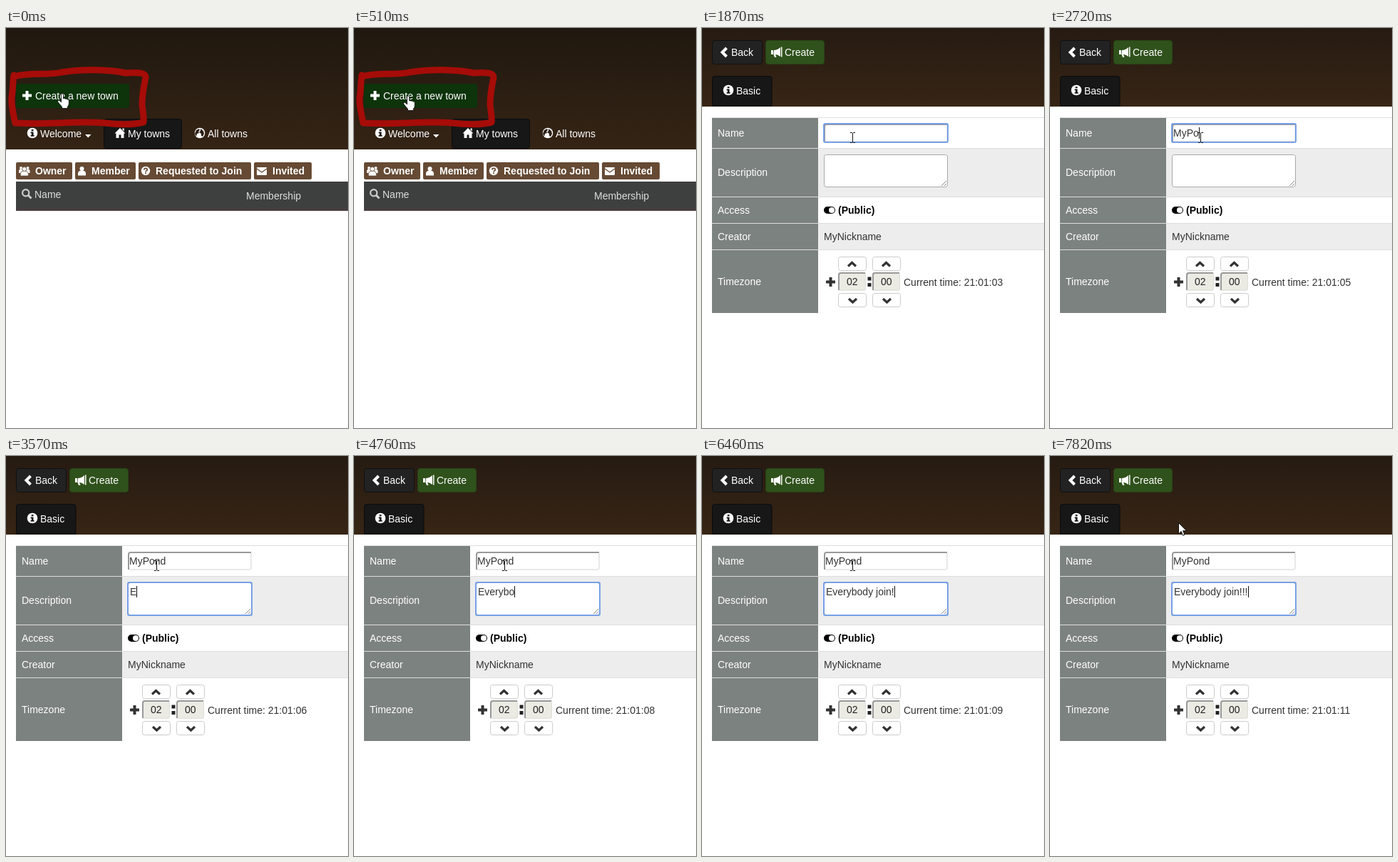
An HTML page for the animation above (7990 ms loop, 480 by 560 pixels).

```html
<!DOCTYPE html>
<html lang="en">
<head>
<meta charset="utf-8">
<title>Create a town</title>
<style>
html, body { margin: 0; width: 100%; height: 100%; overflow: hidden; background: #fff; }
.view, svg { position: absolute; left: 0; top: 0; width: 480px; height: 560px; }
.view { overflow: hidden; background: #fff; font: 14px/20px "Liberation Sans", Arial, sans-serif; color: #333; }
.view[hidden] { display: none; }
p { position: absolute; margin: 0; white-space: pre; left: var(--x); top: var(--y); }
.w { color: #fff; }
.b { font-weight: bold; }
.dim { color: #ddd; }
.caret { position: absolute; width: 1px; height: 16px; margin-top: 2px; background: #111; }
</style>
</head>
<body>
<div class="view" id="list">
  <svg viewBox="0 0 480 560">
    <defs>
      <linearGradient id="head" x2="0" y2="1"><stop stop-color="#20180f"/><stop offset="1" stop-color="#352415"/></linearGradient>
      <g id="info">
        <circle r="7.3" fill="#fff"/>
        <path d="M-1.3-5h2.8v2.3h-2.8zM-2.4-1.4h3.9v4.5h1.1v1.6h-5v-1.6h1.2v-2.9h-1.2z" fill="#17130f"/>
      </g>
      <path id="plus" d="M-2-6.5h4v4.5h4.5v4h-4.5v4.5h-4v-4.5h-4.5v-4h4.5z"/>
      <g id="person"><circle cy="-3.5" r="3"/><path d="M-5.5 6v-2.5q0-3.7 3.5-4.2h4q3.500 .5 3.500 4.200v2.500z"/></g>
    </defs>
    <path d="M0 0h480v170H0z" fill="url(#head)"/>
    <rect x="14" y="78" width="159" height="34" rx="4" fill="#0d340a"/>
    <use href="#plus" x="29.500" y="94.500" fill="#fff"/>
    <rect x="137.500" y="127.500" width="109" height="41" rx="3" fill="#171717" stroke="#0b0b0b"/>
    <use href="#info" x="37" y="147"/>
    <g fill="#fff">
      <path d="M111 149h8.500l-4.250 4.500z"/>
      <path d="M160 140l7.500 7.500h-2v6.500h-4v-4.500h-3v4.500h-4v-6.500h-2zM163.500 140.500h2.200v4l-2.200-2z"/>
      <circle cx="272" cy="147" r="7.300"/>
    </g>
    <path d="M267 143l4-2 1 2-2 2 1 2-3 1-1 4-2-4zM273 141l4 3 1 4-2 4-2-1v-3l-3-2 2-2z" fill="#2d2014"/>
    <g fill="#664a34">
      <rect x="14" y="188" width="79" height="24" rx="2"/>
      <rect x="97" y="188" width="85" height="24" rx="2"/>
      <rect x="186" y="188" width="158" height="24" rx="2"/>
      <rect x="348" y="188" width="81" height="24" rx="2"/>
    </g>
    <g fill="#fff">
      <circle cx="21" cy="196" r="2"/><circle cx="30.500" cy="196" r="2"/>
      <path d="M18 203v-3q0-2 2-2h3v5zM33.500 203v-3q0-2-2-2h-3v5z"/>
      <use href="#person" x="25.800" y="201" stroke="#664a34" stroke-width=".7"/>
      <use href="#person" x="106.500" y="200.500"/>
      <circle cx="196" cy="200" r="6.200"/>
      <rect x="352" y="195" width="14" height="11" rx="1"/>
    </g>
    <path d="M193.800 198.600q0-2.200 2.200-2.200t2.200 2q0 1.100-1.200 1.600-1 .5-1 1.500M196 202.300v1.700" fill="none" stroke="#664a34" stroke-width="1.700"/>
    <path d="M352 197l7 5 7-5" fill="none" stroke="#664a34" stroke-width="1.300"/>
    <path d="M14 215h466v41H14z" fill="#3e403f"/>
    <path d="M14 252h466v4H14z" fill="#463f40"/>
    <g fill="none" stroke="#ccc"><circle cx="27.700" cy="230.700" r="4.600" stroke-width="2.200"/><path d="M31 234l4.500 4.500" stroke-width="2.800"/></g>
    <path d="M11 68C35 61 58 67 78 62 108 57 145 58 168 63 183 62 196 62 196 69 193 83 191 96 191 107 192 118 194 125 193 132 176 136 155 135 138 133 115 131 95 132 72 133 50 134 32 134 13 133 10 120 7 108 8 97 10 87 9 78 11 66"
      fill="none" stroke="#a60c08" stroke-width="9" stroke-linecap="round" stroke-linejoin="round"/>
  </svg>
  <p class="w" style="--x:41px;--y:85px">Create a new town</p>
  <p class="w" style="--x:48px;--y:138px">Welcome</p>
  <p class="w" style="--x:171px;--y:138px">My towns</p>
  <p class="w" style="--x:283px;--y:138px">All towns</p>
  <p class="w b" style="--x:41px;--y:190px">Owner</p>
  <p class="w b" style="--x:120px;--y:190px">Member</p>
  <p class="w b" style="--x:210px;--y:190px">Requested to Join</p>
  <p class="w b" style="--x:374px;--y:190px">Invited</p>
  <p class="dim" style="--x:40px;--y:223px">Name</p>
  <p class="dim" style="--x:337px;--y:225px">Membership</p>
</div>

<div class="view" id="form" hidden>
  <svg viewBox="0 0 480 560">
    <defs>
      <linearGradient id="head2" x2="0" y2="1"><stop stop-color="#261b12"/><stop offset="1" stop-color="#372515"/></linearGradient>
      <g id="info2">
        <circle r="7.300" fill="#fff"/>
        <path d="M-1.300-5h2.800v2.300h-2.800zM-2.400-1.400h3.900v4.500h1.100v1.600h-5v-1.600h1.200v-2.900h-1.200z" fill="#171717"/>
      </g>
      <g id="spin">
        <g fill="#fff" stroke="#ccc">
          <rect x=".5" y="320.500" width="39" height="19" rx="3"/>
          <rect x=".5" y="371.500" width="39" height="19" rx="3"/>
        </g>
        <path d="M14 333.500l5.500-5 5.500 5M15 379l5.500 5 5.500-5" fill="none" stroke="#333" stroke-width="3.200"/>
        <rect y="342" width="39" height="26" rx="3" fill="#ebebe4"/>
        <path d="M1 367v-21q0-3 3-3h34" fill="none" stroke="#999" stroke-width="2"/>
        <path d="M38.500 344v20q0 3-3 3H2" fill="none" stroke="#dededa"/>
      </g>
    </defs>
    <path d="M0 0h480v110H0z" fill="url(#head2)"/>
    <rect x="14.500" y="17.500" width="70" height="33" rx="3.500" fill="#222" stroke="#101010"/>
    <rect x="89.500" y="17.500" width="82" height="33" rx="3.500" fill="#2f511b" stroke="#264516"/>
    <path d="M34.500 28l-6 6 6 6" fill="none" stroke="#fff" stroke-width="4"/>
    <path d="M97 31h3v6h-3zM101 31q5 0 9-4v13q-4-3-7-3l1.500 4h-2.500l-1.500-4zM111 26.500h1.500v14H111z" fill="#fff"/>
    <path id="tab" d="M14.500 109V71q0-3.500 3.500-3.500h76.500q3.500 0 3.500 3.500v38z" fill="#171717" stroke="#0a0a0a"/>
    <path d="M0 110h480v15H0z" fill="#fff"/>
    <use href="#info2" x="37" y="87"/>
    <path d="M163 168h317v68H163zM163 273h317v37H163z" fill="#ededed"/>
    <path d="M14 125h149v274H14z" fill="#7c8280"/>
    <path d="M14 125.500h466M14 168.500h466M14 236.500h466M14 273.500h466M14 310.500h466" stroke="#ddd"/>
    <rect x="171" y="134" width="174" height="26" rx="3" fill="#fff"/>
    <path d="M172 159v-21q0-3 3-3h169" fill="none" stroke="#999" stroke-width="2"/>
    <path d="M344 136v20q0 3-3 3H173" fill="none" stroke="#e9e9e9" stroke-width="2"/>
    <rect x="171.500" y="177.500" width="173" height="45" rx="3" fill="#fff" stroke="#a9a9a9"/>
    <path d="M336 221l7-7M340 221l3-3" stroke="#888"/>
    <g fill="none" stroke="#77a0e6" stroke-width="2">
      <rect id="ring1" x="171" y="134" width="174" height="26" rx="2"/>
      <rect id="ring2" x="171" y="177" width="174" height="46" rx="2"/>
    </g>
    <rect x="171" y="250" width="16" height="10" rx="5"/>
    <circle cx="182" cy="255" r="4" fill="#fff"/>
    <path d="M178 349" />
    <use href="#plus" x="180.500" y="355.500" fill="#333"/>
    <use href="#spin" x="191"/>
    <use href="#spin" x="239"/>
    <path d="M232.500 348.500h5v5h-5zM232.500 357h5v5h-5z" fill="#222"/>
  </svg>
  <p class="w" style="--x:41px;--y:24px">Back</p>
  <p class="w" style="--x:116px;--y:24px">Create</p>
  <p class="w" style="--x:48px;--y:78px">Basic</p>
  <p class="w" style="--x:22px;--y:137px">Name</p>
  <p class="w" style="--x:22px;--y:192px">Description</p>
  <p class="w" style="--x:22px;--y:245px">Access</p>
  <p class="w" style="--x:22px;--y:282px">Creator</p>
  <p class="w" style="--x:22px;--y:345px">Timezone</p>
  <p style="--x:173px;--y:137px"><span id="name"></span><i class="caret" id="caret1"></i></p>
  <p style="--x:174px;--y:180px"><span id="desc"></span><i class="caret" id="caret2"></i></p>
  <p class="b" style="--x:191px;--y:245px;color:#000">(Public)</p>
  <p style="--x:171px;--y:282px">MyNickname</p>
  <p style="--x:203px;--y:345px;color:#222">02</p>
  <p style="--x:251px;--y:345px;color:#222">00</p>
  <p style="--x:283px;--y:346px" id="clock"></p>
</div>

<svg viewBox="0 0 480 560">
  <path id="hand" fill="#fff" stroke="#111" stroke-width=".9" d="M5.500 1.800q1.500-2 3 0v6q1.600-1 2.700.4 1.600-.8 2.500.7 2.100-.5 2.600 1.300v4.800q0 2.500-2 4.300v2.200H6.500v-2.200L1 13q-1-2.200.5-2.800 1.300-.3 2.200 1l1.800 1.600z"/>
  <path id="arrow" fill="#fff" stroke="#111" d="M.5.500v15.500l3.600-3.400 2.500 5.600 2.400-1-2.400-5.500h4.900z"/>
  <path id="beam" fill="none" stroke="#111" d="M0 .5h2.500l1 1 1-1H7M3.500 1v13M0 14.500h2.500l1-1 1 1H7"/>
</svg>

<script>
const STEP = 170, STEPS = 47;
const $ = id => document.getElementById(id);
const show = (el, on) => { el.style.visibility = on ? "inherit" : "hidden"; };
const past = (times, step) => times.filter(t => t <= step).length;

// Steps at which each key is pressed and each second passes.
const nameKeys = [12, 14, 16, 16, 17, 18];
const descKeys = [21, 22, 23, 24, 25, 26, 27, 29, 30, 30, 32, 33, 34, 35, 38, 39, 40];
const ticks = [9, 12, 16, 20, 24, 28, 32, 39, 43];

// First step, shape, x, y
const pointer = [
  [0, "hand", 72, 91], [2, "hand", 71, 93], [3, "hand", 69, 94],
  [8, "arrow", 75, 94], [9, "beam", 208, 146], [46, "arrow", 180, 93]
];

function draw(step) {
  const onForm = step >= 8;
  const inName = step >= 9 && step < 20;
  const inDesc = step >= 20;
  const lit = step !== 11 && step !== 43;

  $("list").hidden = onForm;
  $("form").hidden = !onForm;
  $("tab").setAttribute("fill", step === 8 ? "#0b0b0b" : "#171717");
  $("name").textContent = "MyPond".slice(0, past(nameKeys, step));
  $("desc").textContent = "Everybody join!!!".slice(0, past(descKeys, step));
  $("clock").textContent = "Current time: 21:01:" + String(2 + past(ticks, step)).padStart(2, "0");
  show($("ring1"), inName);
  show($("ring2"), inDesc);
  show($("caret1"), inName && lit);
  show($("caret2"), inDesc && lit);

  const [, shape, x, y] = pointer.filter(p => p[0] <= step).pop();
  for (const id of ["hand", "arrow", "beam"]) show($(id), id === shape);
  $(shape).setAttribute("transform", `translate(${x} ${y})`);
}

const start = performance.now();
let last = -1;
function loop() {
  const step = Math.floor((performance.now() - start) / STEP) % STEPS;
  if (step !== last) draw(last = step);
  requestAnimationFrame(loop);
}
loop();
</script>
</body>
</html>
```
